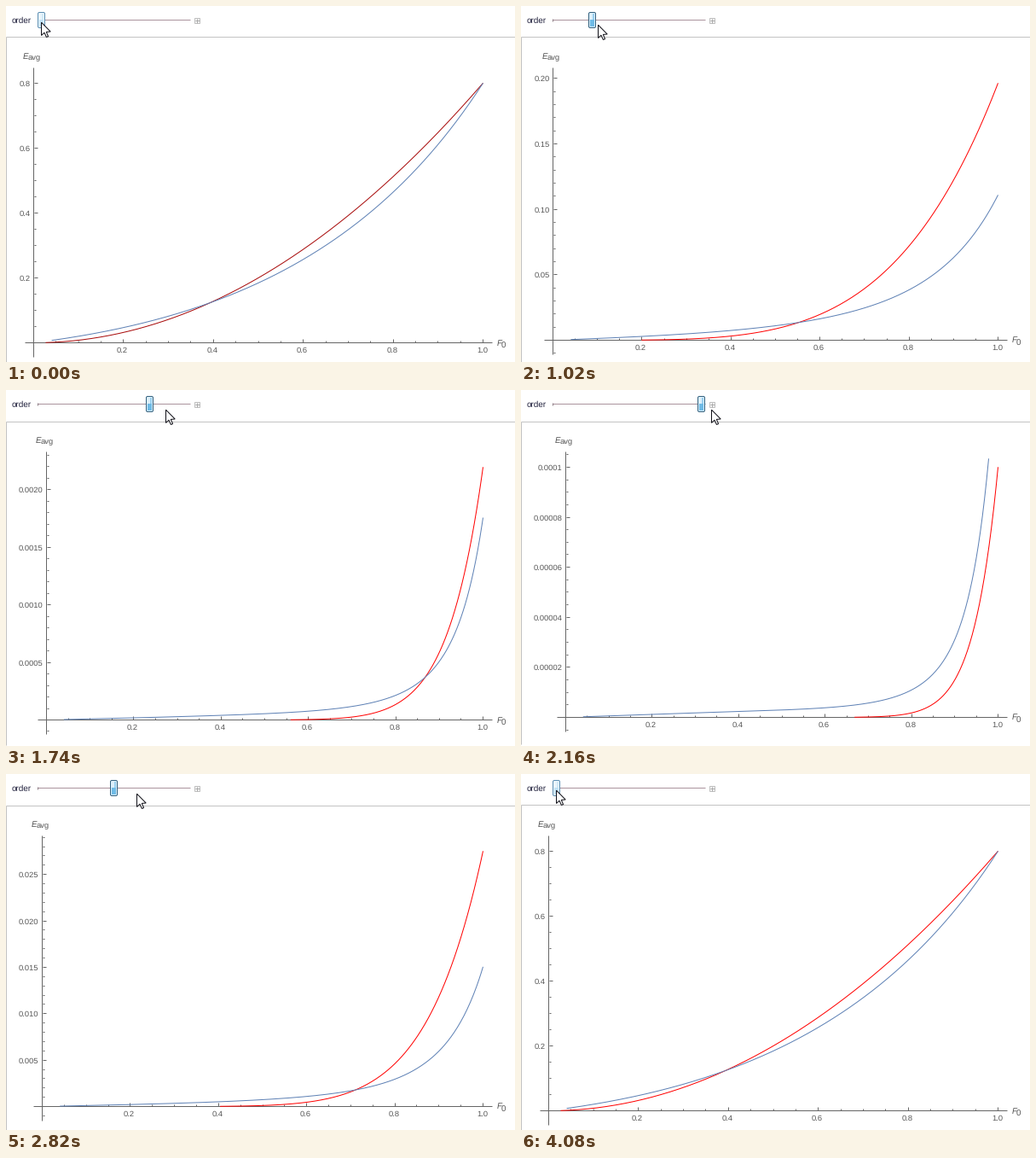
Recreate the animation shown at these times as a matplotlib script. Size 597x417 px, loop 4560 ms.

```python
import math

import numpy as np
import matplotlib.pyplot as plt
from matplotlib.animation import FuncAnimation
from matplotlib.patches import FancyBboxPatch, Polygon, Rectangle

W, H, DPI = 597, 417, 64
PX = 72 / DPI  # points per pixel
FRAMES, STEP = 76, 60
PEAK_Y, TOP_Y, RIGHT_X = 90.3, 72, 559.5

AXIS, LABEL, BORDER = "#666666", "#555555", "#c3c3c3"
RED, DARK_RED, BLUE = "#ff0000", "#a80a0a", "#5e81b5"

# Blue curve per order: end height relative to red, then growth a + b x + c x^3
GROWTH = {
    1: (1.0, 1.53, 0.0, 0.15),
    2: (0.565, 2.15, 1.9, 1.0),
    3: (0.547, 2.7, 2.9, 3.95),
    4: (0.8, 2.95, 3.4, 7.3),
    5: (1.55, 3.2, 3.8, 11.5),
}

# Start time in ms, order, cursor tip; the second half runs backwards
POSES = [
    (0, 1, (41, 18)), (480, 1, (51, 19)), (720, 1, (60, 21)),
    (1020, 2, (90, 21)), (1200, 3, (111, 22)), (1500, 3, (153, 22)),
    (1740, 4, (187, 22)), (2160, 5, (223, 22)), (2220, 5, (233, 22)),
]

ARROW = np.array([(.5, 1.2), (.5, 16.5), (4, 13.2), (6.4, 18.5),
                  (8.6, 17.6), (6.3, 12.4), (11.2, 12)])

plt.rcParams["text.hinting"] = "none"
fig = plt.figure(figsize=(W / DPI, H / DPI), dpi=DPI, facecolor="white")
ax = fig.add_axes([0, 0, 1, 1])


def line(xs, ys, color, z=2):
    ax.plot(xs, ys, color=color, lw=PX, zorder=z, solid_capstyle="butt")


def text(x, y, s, size=9.4, color=LABEL, **kw):
    ax.text(x, y, s, fontsize=size * PX, color=color,
            family="Liberation Sans", va="baseline", **kw)


def peak_value(order):
    k = order - 1
    return 0.8 * math.exp(-1.1231 * k - 0.2809 * k * k)


def nice_step(peak):
    """Largest 1, 2 or 5 times a power of ten that fits about four times."""
    room = peak / 3.9
    power = math.floor(math.log10(room))
    digit = max(d for d in (1, 2, 5) if d <= room / 10 ** power)
    return digit * 10 ** power, -power, 4 if digit == 2 else 5


def blue_curve(x, order):
    end, a, b, c = GROWTH[order]
    return end * x * np.exp((x - 1) * (a + b * x + c * x ** 3))


def draw_plot(order, red):
    peak = peak_value(order)
    step, decimals, minor = nice_step(peak)
    x0, y0 = 27 + 5 * order, round(396.7 - 2.7 * order)
    top, bottom, low = 36 + (order > 2), H - max(0, order - 3), y0 + 17
    px = lambda v: x0 + .5 + v * (RIGHT_X - x0 - .5)
    py = lambda v: y0 + .5 - v * (y0 + .5 - PEAK_Y)

    line([0, W], [top, top], BORDER)
    line([0, 0], [top, bottom], BORDER)
    line([x0 - 10, 570], [y0, y0], AXIS)
    line([x0, x0], [TOP_Y, low], AXIS)

    for i in range(1, 21):
        major = i % 4 == 0
        x = math.floor(px(i / 20))
        line([x, x], [y0, y0 - (4 if major else 2)], AXIS)
        if major:
            text(x - .5, y0 + 12, f"{i / 20:.1f}", ha="center")

    for i in range(-2, 40):
        y = math.floor(py(i * step / minor / peak))
        if i == 0 or not TOP_Y <= y <= low:
            continue
        major = i > 0 and i % minor == 0
        line([x0 + 1, x0 + (5 if major else 3)], [y, y], AXIS)
        if major:
            label = f"{i // minor * step:.{decimals}f}"
            if decimals > 4:
                label = label.rstrip("0")
            text(x0 - 3.5, y + 3.8, label, ha="right")

    text(x0 - 12, 62, "E", 9.8, style="italic")
    text(x0 - 6, 63.5, "avg")
    text(576, y0 + 3.5, "F", 9.8, style="italic")
    text(581, y0 + 6.8, "0", 9.8)

    power = (order + 1) ** 2 / 2
    x = np.linspace(.0007 ** (1 / power), 1, 240)
    line(px(x), py(x ** power), red, z=3)
    x = np.linspace(.04, 1, 400)
    y = py(blue_curve(x, order))
    seen = y >= TOP_Y
    line(px(x[seen]), y[seen], BLUE, z=4)


def draw_slider(order, hover):
    text(7, 20, "order", 9.85, "#20203c")
    line([37, 216], [16, 16], "#ab939d")
    line([37, 37], [15, 18], "#8c7c84")

    ax.add_patch(Rectangle((221, 14), 6, 6, fc="#f4f4f4", ec="#c0c0c0",
                           lw=PX, zorder=2))
    line([222, 227], [17, 17], "#acacac")
    line([224, 224], [15, 20], "#acacac")

    left = 37 + int((order - 1) * 42.5)
    edge, upper, lower = (("#5c8fb2", "#eaf5fc", "#c3e3f6") if hover
                          else ("#34627f", "#dceffa", "#6fbbe6"))
    ax.add_patch(FancyBboxPatch((left + 1.5, 8.5), 6, 16,
                                boxstyle="round,pad=1,rounding_size=1.6",
                                fc=upper, ec=edge, lw=PX, zorder=5))
    ax.add_patch(Rectangle((left + 2, 16), 5, 8, fc=lower, lw=0, zorder=6))
    ax.add_patch(Rectangle((left + 5, 9), 2, 7, fc=lower, alpha=.6, lw=0,
                           zorder=6))


def draw(i):
    ax.cla()
    ax.set(xlim=(0, W), ylim=(H, 0))
    ax.axis("off")
    ms = min(i, FRAMES - 1 - i) * STEP
    start, order, tip = [p for p in POSES if p[0] <= ms][-1]
    fresh = order == 1 and i < FRAMES // 2
    draw_plot(order, DARK_RED if fresh else RED)
    draw_slider(order, hover=start == 0)
    ax.add_patch(Polygon(ARROW + tip, fc="white", ec="#101018", lw=PX,
                         joinstyle="miter", zorder=9))
    return []


anim = FuncAnimation(fig, draw, frames=FRAMES, interval=STEP, repeat=True,
                     repeat_delay=0, blit=False)
plt.show()
```
